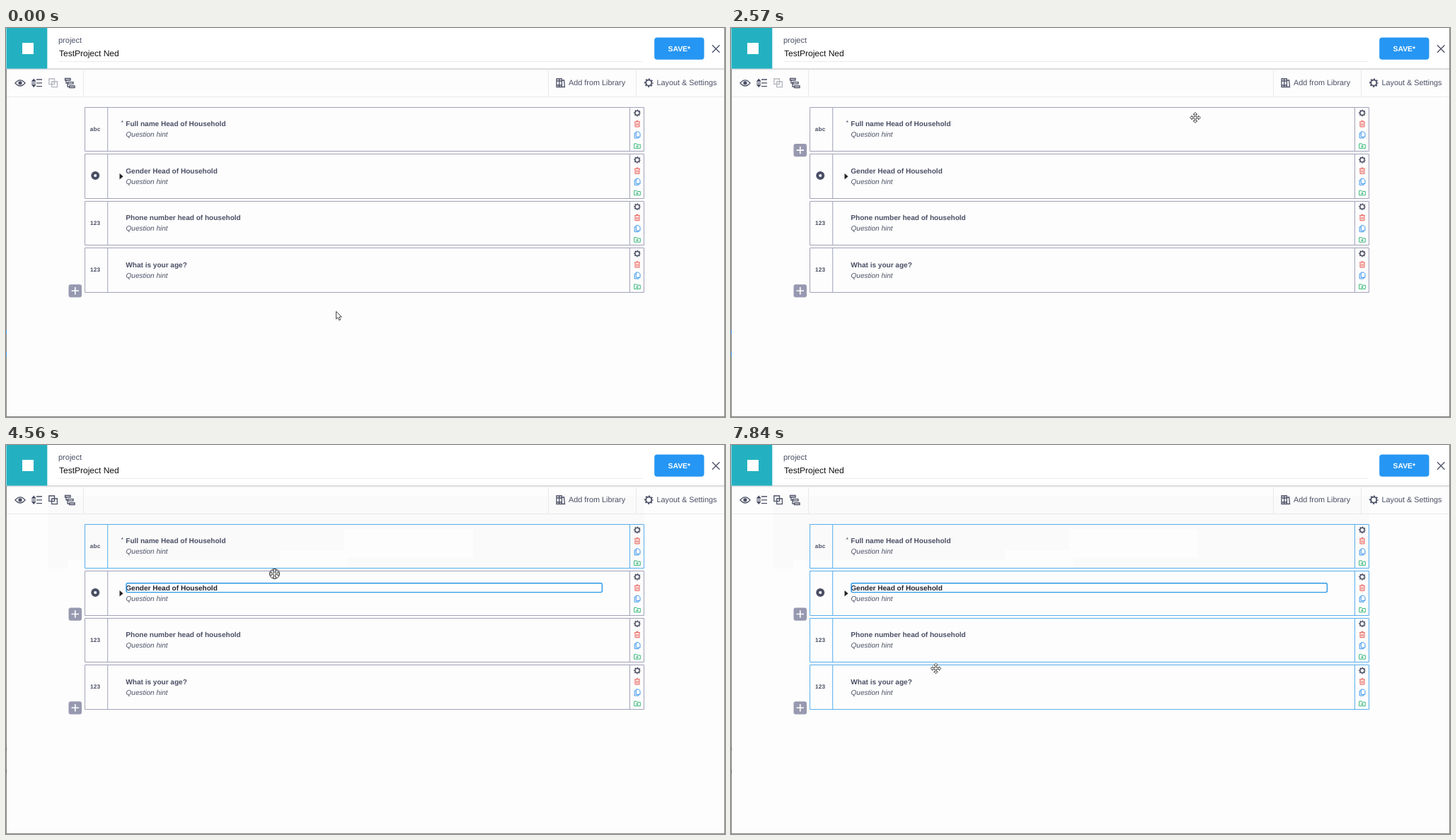
An HTML page that plays this animation: 1016x551 px, repeating every 8 s.

```html
<!DOCTYPE html>
<html lang="en">
<head>
<meta charset="utf-8">
<title>Form builder</title>
<style>
  html, body { margin: 0; width: 100%; height: 100%; overflow: hidden; background: #fdfdfd; }
  svg { display: block; width: 1016px; height: 551px; font-family: "Liberation Sans", Arial, sans-serif; }
  text { fill: #4b4f65; white-space: pre; text-rendering: geometricPrecision; }
  .line { fill: none; stroke: #4b4f65; stroke-width: 1.3; }
  .frame { fill: none; stroke: #a1a3b8; }
  .selected .frame { stroke: #58aeec; }
  .label { font-size: 10.05px; font-weight: bold; }
  .hint { font-size: 10px; font-style: italic; }
  .type { font-size: 8.2px; font-weight: bold; text-anchor: middle; letter-spacing: .2px; }
  .tool { font-size: 10.85px; }
  .focused .label { fill: #20242f; }
</style>
</head>
<body>
<svg viewBox="0 0 1016 551">
  <defs>
    <g id="gear" fill="none" stroke="#4b4f65">
      <circle r="3.1" stroke-width="1.4"/>
      <circle r="4.2" stroke-width="1.3" stroke-dasharray="1.649" stroke-dashoffset=".825"/>
    </g>
    <g id="trash" fill="none" stroke="#e8574f">
      <path d="M-4 -3H4M-1.5 -4.3H1.5M-3 -2.5V4H3V-2.5M-1 -1V2.5M1 -1V2.5"/>
    </g>
    <g id="copy" fill="none" stroke="#3a97ee">
      <path d="M-1.7 -4.5H1.8L4 -2.3V2.8H-1.7ZM-2 -2.5H-3.8V4.5H2V3"/>
    </g>
    <g id="folder" fill="none" stroke="#36b878">
      <path d="M-4.3 -3H-1L0 -1.8H4.3V3.5H-4.3ZM-1.8 .9H1.8M0 -.9V2.7"/>
    </g>
    <g id="plus">
      <rect x="88.5" y="51.8" width="18.5" height="18.2" rx="3" fill="#9799b0"/>
      <path d="M92.5 60.8H103M97.75 55.6V66" stroke="#fff" stroke-width="1.6"/>
    </g>
    <g id="arrow">
      <path d="M.5 .5V11.2L3 8.9L4.8 13L6.7 12.2L4.9 8.2H8.2Z" fill="#fff" stroke="#333" stroke-width=".9"/>
    </g>
    <g id="ibeam">
      <path d="M-2.5 -5H-.8L0 -4.3L.8 -5H2.5M0 -4.5V4.5M-2.5 5H-.8L0 4.3L.8 5H2.5" fill="none" stroke="#222"/>
    </g>
    <g id="move">
      <path d="M0 -7.5L2.8 -4.6H1V-1H4.6V-2.8L7.5 0L4.6 2.8V1H1V4.6H2.8L0 7.5L-2.8 4.6H-1V1H-4.6V2.8L-7.5 0L-4.6 -2.8V-1H-1V-4.6H-2.8Z" fill="#fff" stroke="#333" stroke-width=".9"/>
    </g>
    <g id="drag">
      <use href="#move"/>
      <circle r="7" fill="none" stroke="#333"/>
    </g>
  </defs>

  <rect width="1016" height="551" fill="#fdfdfd"/>
  <g id="shade">
    <rect x="60" y="72" width="842" height="103" fill="#fafafa"/>
    <g fill="#fdfdfd">
      <rect data-from="3350" x="478" y="119" width="182" height="41"/>
      <rect data-from="3500" x="387" y="149" width="96" height="15"/>
      <rect data-from="3740" x="88" y="163" width="395" height="12"/>
    </g>
  </g>

  <rect width="1016" height="57" fill="#fff"/>
  <path d="M0 57.5H1016" stroke="#dadadc"/>
  <path d="M0 58.5H1016" stroke="#e2e2e4"/>
  <path d="M0 59.5H1016" stroke="#f3f3f4"/>
  <rect x=".5" width="57.8" height="57.6" fill="#23b1c1"/>
  <rect x="23" y="21" width="16" height="16" fill="#fff"/>
  <text x="74" y="21" font-size="11">project</text>
  <text x="75" y="40" font-size="12" style="fill:#111">TestProject Ned</text>
  <path d="M74 47.5H900" stroke="#ebebeb"/>
  <rect x="916.2" y="13.6" width="70.3" height="31.2" rx="4" fill="#2596f3"/>
  <text x="951.3" y="32.7" font-size="10.4" font-weight="bold" text-anchor="middle" style="fill:#fff">SAVE*</text>
  <path d="M998 24.3L1008.4 34.7M1008.4 24.3L998 34.7" class="line"/>

  <path d="M0 97.5H1016M109.5 60V97M766.5 60V97M890.5 60V97" stroke="#e8e9ee"/>
  <g class="line">
    <path d="M13 78Q20 69.8 27 78Q20 86 13 78Z"/>
    <circle cx="20" cy="77.8" r="2" fill="#4b4f65"/>
    <path d="M43 73H51M43 77.8H51M43 82.6H51M36 77.8H42"/>
    <path d="M37 75.3L39.2 72.5L41.4 75.3ZM37 80.3L39.2 83.1L41.4 80.3Z" fill="#4b4f65"/>
    <path id="group" d="M60.8 72H68.5V79.7H60.8ZM64.7 76H72.4V83.7H64.7Z"/>
    <path d="M83.5 71.5H91V74H83.5ZM87.5 76.7H95V79.2H87.5ZM89.5 82H97V84.5H89.5ZM85 74V78H87.5M87 79V83.2H89.5"/>
    <path d="M778 72H781.7V83.5H778ZM781.7 72H785.4V83.5H781.7ZM785.8 74.5L788.5 73.8L789.5 83.5H785.4M778 75H785.4M778 81H785.4"/>
  </g>
  <text class="tool" x="795" y="81">Add from Library</text>
  <use href="#gear" transform="translate(908.3 77.7) scale(1.3)"/>
  <text class="tool" x="919.5" y="81">Layout &amp; Settings</text>

  <g id="rows"></g>
  <rect id="focus" x="170" y="195.8" width="672.4" height="12.8" rx="2" fill="none" stroke="#2a98e8" stroke-width="1.4"/>
  <path id="caret" d="M298.5 197V208" stroke="#111"/>
  <path d="M.5 58V551M0 550.5H1016M1015.5 0V551" stroke="#858585" fill="none"/>
  <path id="edge" d="M.5 428V433M.5 459V465" stroke="#3a97ee"/>
  <use id="cursor"/>
</svg>

<script>
const LOOP = 8000;
const ROW_TOP = 112.3, ROW_PITCH = 66.4, ROW_HEIGHT = 62.6;
const $ = id => document.getElementById(id);

const questions = [
  { label: 'Full name Head of Household', type: 'abc', selectAt: 2950, plus: [[1290, 3620]] },
  { label: 'Gender Head of Household', selectAt: 4690, plus: [[1020, 1290], [3620, LOOP]] },
  { label: 'Phone number head of household', type: '123', selectAt: 6260, plus: [[5420, 7130]] },
  { label: 'What is your age?', type: '123', selectAt: 7840, plus: [[0, LOOP]] }
];
const caretOn = [[4040, 4440], [5000, 5570], [5970, 6560], [7130, 7690]];

// Pointer steps: time, x, y, shape
const pointer = [
  [0, 466, 401, 'arrow'], [280, 466, 405, 'arrow'], [400, 467, 408, 'arrow'],
  [660, 530, 388, 'arrow'], [780, 690, 325, 'move'], [900, 808, 262, 'move'],
  [1020, 806, 222, 'ibeam'], [1140, 764, 195, 'ibeam'], [1290, 732, 169, 'move'],
  [1410, 705.5, 152.5, 'ibeam'], [1560, 682, 145, 'ibeam'], [1680, 667.5, 140.5, 'ibeam'],
  [1820, 663, 131, 'ibeam'], [1940, 662, 127, 'move'], [2570, 656, 127, 'move'],
  [2690, 652, 127, 'move'], [3220, 560, 141, 'ibeam'], [3350, 480.5, 154.5, 'ibeam'],
  [3500, 432, 170, 'move'], [3620, 397, 193, 'move'], [3740, 385.5, 201.5, 'ibeam'],
  [3890, 395.5, 199.5, 'ibeam'], [4040, 391.5, 199.5, 'ibeam'], [4290, 385, 188, 'move'],
  [4440, 379.5, 182.5, 'move'], [4560, 379.5, 182.5, 'drag'], [4690, 379.5, 182.5, 'move'],
  [5150, 357, 214, 'move'], [5270, 337, 241, 'move'], [5420, 325.5, 254.5, 'move'],
  [6850, 303, 290, 'move'], [6980, 289.5, 313.5, 'move'], [7130, 289.5, 317.5, 'move'],
  [7570, 289.5, 316.5, 'move']
];

// Frame lines sit on whole pixels; the contents keep the fractional pitch.
function rowMarkup({ label, type }, i) {
  const top = ROW_TOP + i * ROW_PITCH;
  const y0 = Math.floor(top) + .5, y1 = Math.floor(top + ROW_HEIGHT) + .5;
  const icons = ['gear', 'trash', 'copy', 'folder'].map((icon, n) =>
    `<use href="#${icon}" x="892" y="${8.1 + n * 15.5}"/>`).join('');
  return `
  <g id="row${i}">
    <path class="frame" d="M111.5 ${y0}H901.5V${y1}H111.5ZM143.7 ${y0}V${y1}M881.5 ${y0}V${y1}"/>
    <g transform="translate(0 ${top})">
      ${type
        ? `<text class="type" x="126.2" y="33.5">${type}</text>`
        : `<circle cx="126.2" cy="30.4" r="4" fill="none" stroke="#4b4f65" stroke-width="4"/>
           <path d="M160.5 27.4L165.5 31.6L160.5 35.8Z" fill="#222"/>`}
      ${i ? '' : '<text x="162.5" y="24.7" font-size="9">*</text>'}
      <text class="label" x="169.3" y="27">${label}</text>
      <text class="hint" x="169.6" y="42.1">Question hint</text>
      ${icons}
      <use id="plus${i}" href="#plus"/>
    </g>
  </g>`;
}
$('rows').innerHTML = questions.map(rowMarkup).join('');

const within = (ranges, t) => ranges.some(([from, to]) => t >= from && t < to);
const show = (el, on) => { el.style.display = on ? '' : 'none'; };

function render(t) {
  questions.forEach((q, i) => {
    $('row' + i).classList.toggle('selected', t >= q.selectAt);
    show($('plus' + i), within(q.plus, t));
  });
  const anySelected = t >= questions[0].selectAt;
  show($('shade'), anySelected);
  document.querySelectorAll('[data-from]').forEach(el => show(el, t >= +el.dataset.from));
  $('group').style.stroke = anySelected ? '' : '#b5b6bf';
  $('edge').style.stroke = anySelected ? '#666' : '';

  const focused = t >= 4040;
  show($('focus'), focused);
  $('row1').classList.toggle('focused', focused);
  show($('caret'), within(caretOn, t));

  const [, x, y, shape] = pointer.findLast(step => step[0] <= t);
  $('cursor').setAttribute('href', '#' + shape);
  $('cursor').setAttribute('transform', `translate(${x} ${y})`);
}

const start = performance.now();
function tick() {
  render((performance.now() - start) % LOOP);
  requestAnimationFrame(tick);
}
tick();
</script>
</body>
</html>
```
